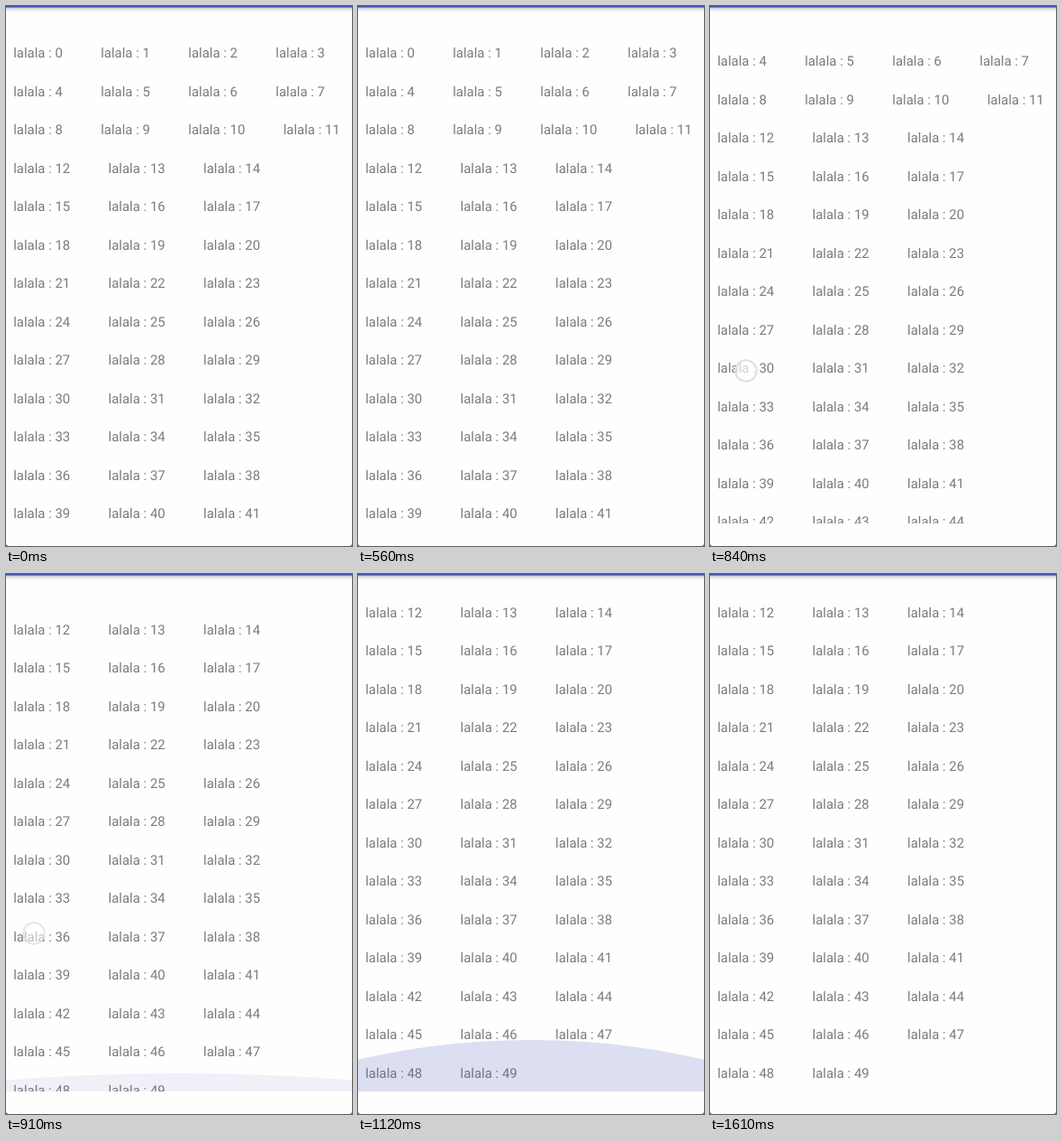
Animation, 384 px wide and 598 px high, one loop 1820 ms. Source, as an HTML page with a canvas:

```html
<!DOCTYPE html>
<html lang="en">
<head>
<meta charset="utf-8">
<title>Flow list</title>
<style>
html, body { margin: 0; width: 100%; height: 100%; overflow: hidden; background: #fefefe; }
canvas { display: block; }
</style>
</head>
<body>
<canvas id="stage" width="384" height="598"></canvas>
<script>
const W = 384, H = 598, LOOP = 1820, STEP = 70;
const LIST_TOP = 27, LIST_BOTTOM = 573, ROW = 42.5, GAP = 42.4, LEFT = 8.2;
const ctx = document.getElementById('stage').getContext('2d');
ctx.font = '14.93px Roboto, sans-serif';
ctx.textRendering = 'geometricPrecision'; // unrounded glyph advances

// Keyframes: [time, value, ...]
const SCROLL = [[770, 0], [840, 33.5], [910, 118], [980, 137]];
const TOUCH = [[770, 52, 434, 1], [840, 40, 404, 1], [910, 31, 398, 0.8], [980, 29, 397, 0.5]];
const GLOW = [[910, 20, 0.08], [980, 63, 0.25], [1120, 57, 0.175], [1260, 30, 0.1], [1330, 23, 0.075]];

function sample(keys, t) {
  if (t <= keys[0][0]) return keys[0].slice(1);
  for (let i = 1; i < keys.length; i++) {
    const a = keys[i - 1], b = keys[i];
    if (t <= b[0]) {
      const k = (t - a[0]) / (b[0] - a[0]);
      return a.slice(1).map((v, j) => v + (b[j + 1] - v) * k);
    }
  }
  return keys[keys.length - 1].slice(1);
}

// Wrap the labels into rows
function layout() {
  const items = [];
  let x = LEFT, y = 57;
  for (let i = 0; i < 50; i++) {
    const text = 'lalala : ' + i;
    const w = ctx.measureText(text).width;
    if (x + w > W) {
      x = LEFT;
      y += ROW;
    }
    items.push({ text, x, y });
    x += w + GAP;
  }
  return items;
}
const items = layout();

function drawList(scroll) {
  ctx.fillStyle = '#7b7b7b';
  for (const { text, x, y } of items) {
    const baseline = y - scroll;
    if (baseline > LIST_TOP && baseline < H + ROW) ctx.fillText(text, x, baseline);
  }
}

function drawGlow(height, alpha) {
  const r = 576, scale = height / 86;
  ctx.fillStyle = `rgba(63, 81, 181, ${alpha})`;
  ctx.beginPath();
  ctx.ellipse(W / 2, LIST_BOTTOM - height + r * scale, r, r * scale, 0, 0, 2 * Math.PI);
  ctx.fill();
}

function drawTouch(x, y, alpha) {
  ctx.globalAlpha = alpha;
  ctx.beginPath();
  ctx.arc(x, y, 11.7, 0, 2 * Math.PI);
  ctx.fillStyle = 'rgba(255, 255, 255, 0.65)';
  ctx.fill();
  ctx.strokeStyle = '#dfdfdf';
  ctx.lineWidth = 2;
  ctx.stroke();
  ctx.globalAlpha = 1;
}

function drawChrome() {
  const shadow = ctx.createLinearGradient(0, 1, 0, 7);
  shadow.addColorStop(0, 'rgba(70, 75, 110, 0.45)');
  shadow.addColorStop(0.4, 'rgba(90, 90, 110, 0.17)');
  shadow.addColorStop(1, 'rgba(90, 90, 110, 0)');
  ctx.fillStyle = shadow;
  ctx.fillRect(0, 1, W, 6);
  ctx.fillStyle = '#3f51b5';
  ctx.fillRect(0, 0, W, 1.5);

  // Dark rounded screen corners
  ctx.fillStyle = '#555';
  for (const [x, dir] of [[0, 1], [W, -1]]) {
    ctx.beginPath();
    ctx.moveTo(x, H);
    ctx.lineTo(x, H - 3);
    ctx.quadraticCurveTo(x, H, x + 3 * dir, H);
    ctx.fill();
  }
}

function draw(t) {
  ctx.fillStyle = '#fefefe';
  ctx.fillRect(0, 0, W, H);
  ctx.save();
  ctx.beginPath();
  ctx.rect(0, 0, W, LIST_BOTTOM);
  ctx.clip();
  drawList(sample(SCROLL, t)[0]);
  if (t >= 910 && t < 1610) drawGlow(...sample(GLOW, t));
  ctx.restore();
  if (t >= 770 && t < 1050) drawTouch(...sample(TOUCH, t));
  drawChrome();
}

const start = performance.now();
function tick() {
  const t = (performance.now() - start) % LOOP;
  draw(Math.floor(t / STEP) * STEP);
  requestAnimationFrame(tick);
}
tick();
</script>
</body>
</html>
```
